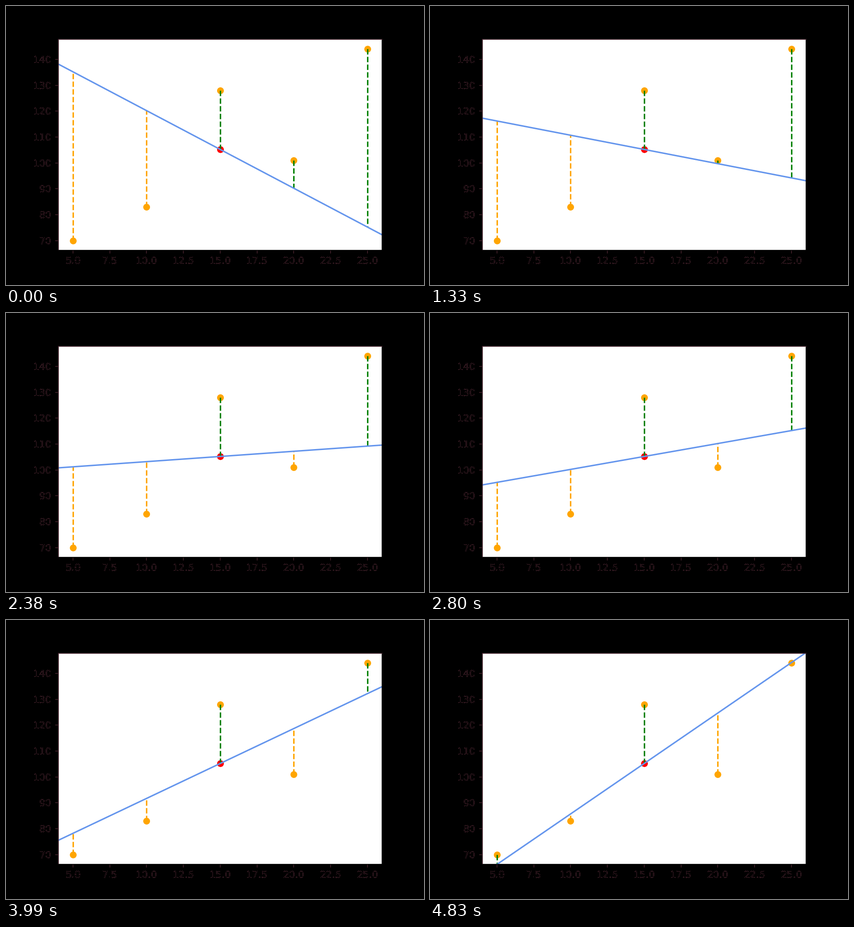
These frames come from a looping animation (917 by 611 pixels, 4900 ms). A matplotlib script:

```python
import matplotlib.pyplot as plt
import numpy as np
from matplotlib.animation import FuncAnimation
from matplotlib.colors import to_rgba

W, H, DPI = 917, 611, 152.75
FRAMES, INTERVAL = 70, 70
EDGE = "#42202a"

X = np.array([5, 10, 15, 20, 25])
Y = np.array([70, 83, 128, 101, 144])
MEAN_X, MEAN_Y = X.mean(), Y.mean()
X_LIM = np.array([4, 26])
Y_LIM = (66.3, 147.7)


def fit(x, slope):
    """Line of the given slope through the mean point."""
    return MEAN_Y + slope * (x - MEAN_X)


def outline_only(image, dpi):
    """Keep just the soft rim of the glyphs."""
    alpha = image[..., 3]
    out = np.zeros_like(image)
    out[(alpha > 0.2) & (alpha < 0.9)] = to_rgba(EDGE)
    return out, 0, 0


plt.rcParams["font.family"] = "DejaVu Sans"
# the tiny margin guards against rounding down a pixel
fig = plt.figure(figsize=((W + 1e-6) / DPI, (H + 1e-6) / DPI), dpi=DPI,
                 facecolor="black")
ax = fig.add_axes([0.125, 0.125, 0.775, 0.755], facecolor="white")
ax.set_xlim(*X_LIM)
ax.set_ylim(*Y_LIM)
ax.set_xticks(np.arange(5, 25.1, 2.5))
ax.set_yticks(np.arange(70, 141, 10))
ax.tick_params(color=EDGE, labelcolor="black", labelsize=10,
               length=3.5, width=0.8, pad=3.5)
for label in ax.get_xticklabels() + ax.get_yticklabels():
    label.set_agg_filter(outline_only)
for side, spine in ax.spines.items():
    spine.set_linewidth(0.8)
    spine.set_color(EDGE if side in ("left", "top") else "black")

ax.plot(X, Y, "o", color="orange", ms=6, zorder=2)
ax.plot(MEAN_X, MEAN_Y, "o", color="red", ms=6, zorder=2)
residuals = [ax.plot([], [], "--", lw=1.5, zorder=2.1)[0] for _ in X]
line, = ax.plot([], [], color="cornflowerblue", lw=1.5, zorder=2.2)


def update(frame):
    slope = -3 + 0.1 * frame
    line.set_data(X_LIM, fit(X_LIM, slope))
    for residual, x, y in zip(residuals, X, Y):
        y_fit = fit(x, slope)
        residual.set_data([x, x], [y, y_fit])
        residual.set_color("green" if y > y_fit else "orange")
    return [line, *residuals]


anim = FuncAnimation(fig, update, frames=FRAMES, interval=INTERVAL,
                     repeat=True, blit=False)
plt.show()
```
